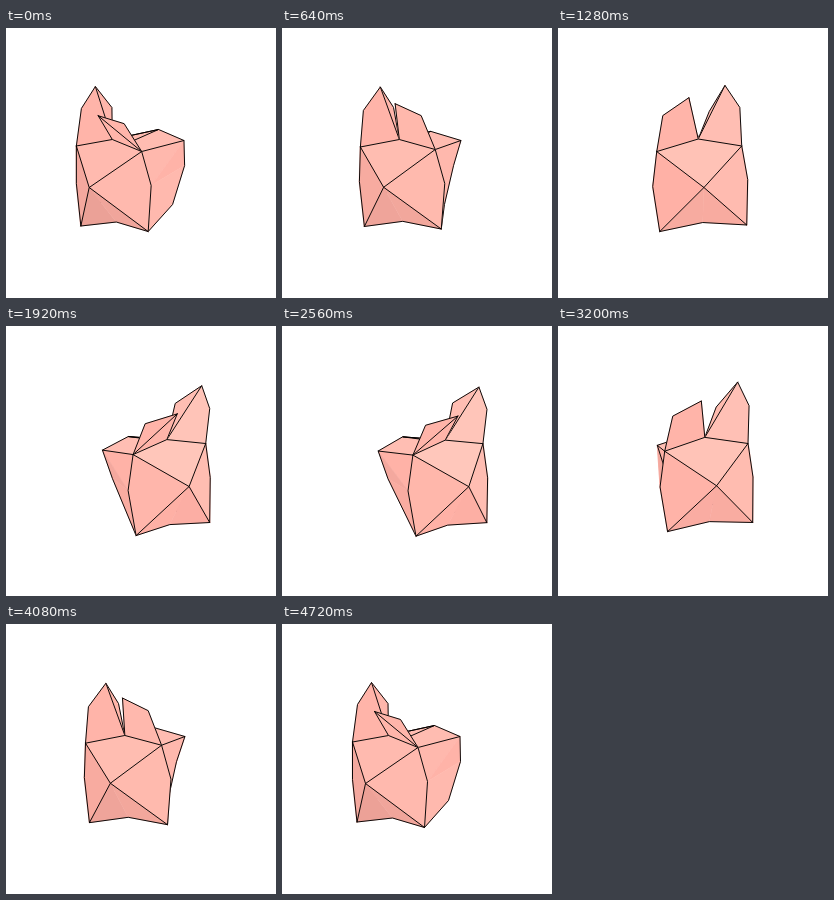
These frames come from a looping animation (270x270 px, 4800 ms). An HTML page:

```html
<!DOCTYPE html>
<html lang="en">
<head>
<meta charset="utf-8">
<title>Turning paper cat</title>
<style>
html, body { margin: 0; width: 100%; height: 100%; overflow: hidden; background: #fff; }
svg { display: block; width: 100vw; height: 100vh; }
path { stroke-linejoin: round; stroke-linecap: round; }
</style>
</head>
<body>
<svg id="stage" viewBox="0 0 270 270"><g transform="translate(.5 .5)">
<g id="back"></g><g id="ears"></g><g id="front"></g>
</g></svg>
<script>
const LOOP = 4800, STEP = 80;

// Turn values at which the corners below are known, by number of known poses
const KNOTS = { 2: [-1.68, 1], 3: [-1.68, 0, 1], 4: [-1.68, -1.18, 0, 1] };

// Corners: x, y per known pose, from turned left to turned right
const CORNERS = {
  nose: [83,159, 145,159, 182,160],
  botL: [74.5,197.5, 82,198, 101,203, 129,209],
  botM: [110,193.5, 144,194, 163,198],
  botR: [142,203, 159,200.5, 188,196.5, 203,196],
  topL: [70,117.5, 78,118.5, 98,123, 126,128],
  topM: [106,111, 117,111, 139.5,110.5, 160,113],
  topR: [135.5,123, 153,121, 183,117.5, 199,117],
  cheekL: [70,155, 77,153, 94,158, 121,164],
  cheekR: [145,157, 162.5,155, 189,151, 203.5,151],
  earLo: [75,80, 81,82, 104,87, 138,97],
  earLt: [89,58, 98,58.5, 130,69, 170,87],
  earLi: [105.5,79, 132,85, 158,97],
  earRo: [118,95, 139,87, 181,79, 203,82],
  earRt: [92,87, 113,75, 166,57, 195,59],
  earRi: [104,100, 150.5,83, 168.5,77],
  rear: [152,101, 136,107, 122,110],
  rearL: [118,116, 101,117, 96,123.5],
  rearR: [177.5,112, 173,113, 160,115],
  flankL: [118,146, 106,152],
  flankR: [178,137, 140,138],
  hipR: [166,176, 144,176]
};

// Each part: faces [corners, shade turned left, shade turned right], then lines
const PARTS = {
  back: [[
    ['topM rear rearR topR', .7, .7],
    ['topM rear rearL topL', .7, .75],
    ['topR rearR cheekR', .6, .6],
    ['cheekR rearR flankR', .48, .5],
    ['cheekR flankR hipR botR', .62, .6],
    ['topL rearL cheekL', .4, .45],
    ['cheekL rearL flankL', .2, .2],
    ['cheekL flankL botL', .3, .3]
  ], [
    'topM rear rearR topR', 'rearR flankR hipR botR',
    'topM rear rearL topL', 'rearL flankL botL'
  ]],
  innerL: [[['earLt earLi topM', .55, .5]], ['earLt earLi topM']],
  outerL: [[['topL earLo earLt topM', .5, .5]], ['topL earLo earLt topM']],
  innerR: [[['earRt earRi topM', .5, .75]], ['earRt earRi topM']],
  outerR: [[['topR earRo earRt topM', .52, .9]], ['topR earRo earRt topM']],
  front: [[
    ['nose topL topM topR', .66, .95],
    ['nose topL cheekL botL', .2, .55],
    ['nose topR cheekR botR', .62, .72],
    ['nose botL botM', .03, .4],
    ['nose botM botR', .12, .36]
  ], [
    'topL topM topR cheekR botR botM botL cheekL topL',
    'topL nose topR', 'botL nose botR'
  ]]
};

const SVG = 'http://www.w3.org/2000/svg';
const el = id => document.getElementById(id);

function add(parent, tag, attrs = {}) {
  const node = document.createElementNS(SVG, tag);
  for (const k in attrs) node.setAttribute(k, attrs[k]);
  return parent.appendChild(node);
}

function buildPart(parent, [faces, lines]) {
  const g = add(parent, 'g');
  return {
    g,
    faces: faces.map(([names, a, b]) =>
      ({ names: names.split(' '), a, b, node: add(g, 'path', { 'stroke-width': .6 }) })),
    lines: lines.map(names =>
      ({ names: names.split(' '), node: add(g, 'path', { fill: 'none', stroke: '#000', 'stroke-width': .95 }) }))
  };
}

const earL = add(el('ears'), 'g'), earR = add(el('ears'), 'g');
const parts = [
  buildPart(el('back'), PARTS.back),
  buildPart(earL, PARTS.innerL), buildPart(earL, PARTS.outerL),
  buildPart(earR, PARTS.innerR), buildPart(earR, PARTS.outerR),
  buildPart(el('front'), PARTS.front)
];
// Creases that show only when an ear is seen edge-on
const foldL = buildPart(earL, [[], ['topL earLt']]);
const foldR = buildPart(earR, [[], ['topR earRt']]);
parts.push(foldL, foldR);

// Smooth curve through the known poses
function weights(knots, p) {
  return knots.map((k, i) =>
    knots.reduce((w, q, j) => i === j ? w : w * (p - q) / (k - q), 1));
}

function place(p) {
  const out = {};
  for (const name in CORNERS) {
    const c = CORNERS[name], w = weights(KNOTS[c.length / 2], p);
    const sum = o => w.reduce((s, v, i) => s + v * c[2 * i + o], 0).toFixed(2);
    out[name] = sum(0) + ' ' + sum(1);
  }
  return out;
}

function tint(v) {
  return `rgb(${Math.min(255, Math.round(234 + 50 * v))},${Math.round(160 + 40 * v)},${Math.round(150 + 38 * v)})`;
}

function turnAt(t) {
  const u = 2 * Math.PI * (Math.floor(t / STEP) + .6) * STEP / LOOP;
  return -.245 - 1.44 * Math.cos(u) - .05 * Math.sin(2 * u);
}

function draw(t) {
  const p = turnAt(t), at = place(p), mix = (p + 1.68) / 2.68;
  const trace = names => 'M' + names.map(n => at[n]).join('L');
  for (const part of parts) {
    for (const f of part.faces) {
      const color = tint(f.a + (f.b - f.a) * mix);
      f.node.setAttribute('d', trace(f.names) + 'Z');
      f.node.setAttribute('fill', color);
      f.node.setAttribute('stroke', color);
    }
    for (const l of part.lines) l.node.setAttribute('d', trace(l.names));
  }
  foldL.g.style.display = p > .65 ? '' : 'none';
  foldR.g.style.display = p < -1.4 ? '' : 'none';
  // The nearer ear goes on top
  const near = p < 0 ? earR : earL;
  if (el('ears').lastChild !== near) el('ears').appendChild(near);
}

const start = performance.now();
function tick() {
  draw((performance.now() - start) % LOOP);
  requestAnimationFrame(tick);
}
tick();
</script>
</body>
</html>
```
